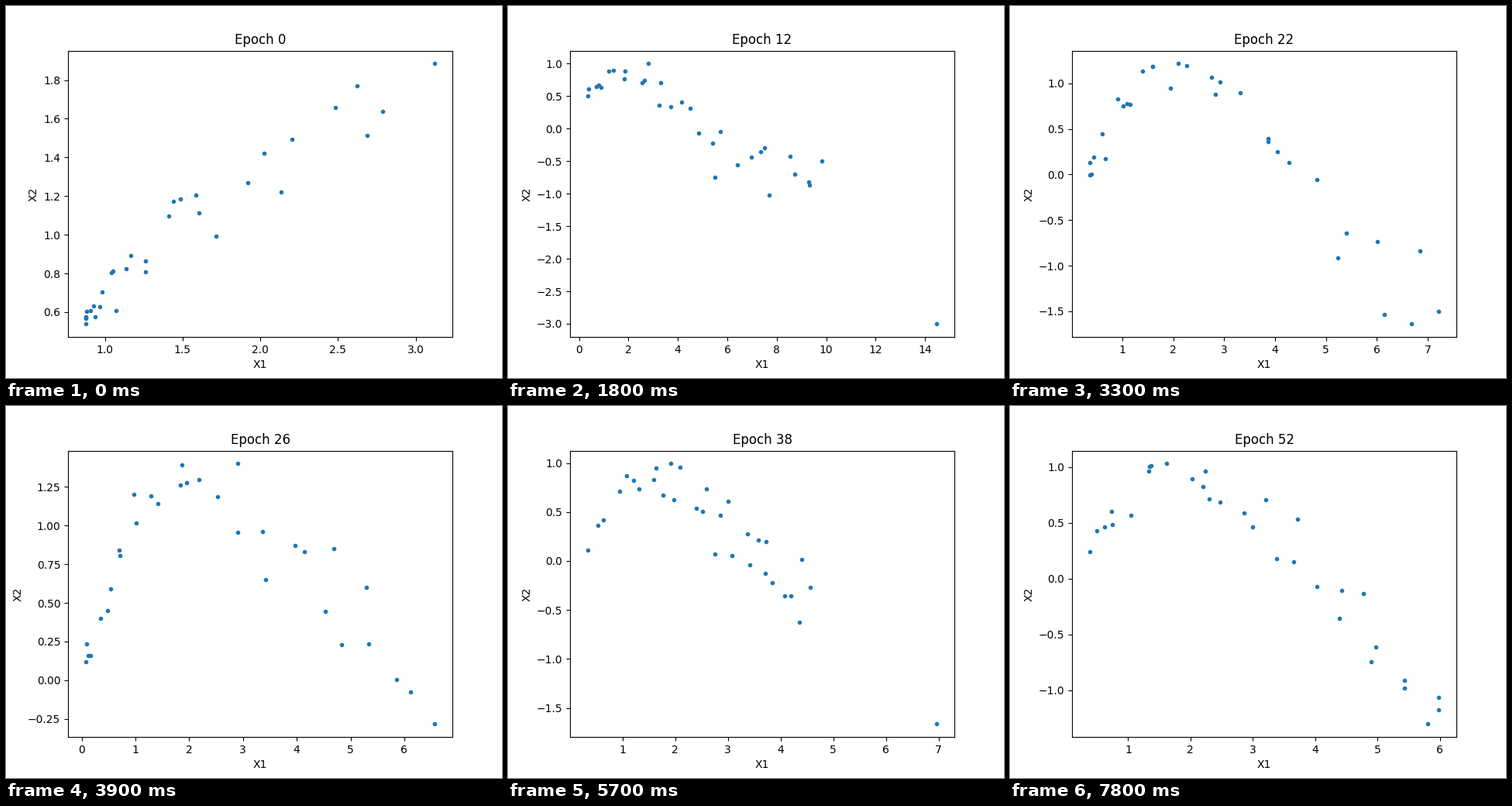
Recreate the animation shown at these times as a matplotlib script. Size 640x480 px, loop 8 s.

```python
import matplotlib.pyplot as plt
import numpy as np
from matplotlib.animation import FuncAnimation

BATCH = 32
STEP_MS = 300
INTERVAL = 100
LOOP_MS = 8000

# Per epoch: left, right, bottom, top of the cloud, then its shape inside that
# box: width of the body before the farthest point, density skew, position of
# the peak and height of the left end.
CLOUDS = {
    0: (.875, 3.124, .538, 1.885, .85, 2.4, 1.6, 0),
    12: (.345, 14.48, -3.005, 1.0, .67, 1.3, .08, .9),
    18: (.63, 7.87, -3.0, 1.035, .96, 1.75, .1, .9),
    26: (.07, 6.57, -.283, 1.4, .93, 1.6, .3, .32),
    34: (.35, 8.14, -1.725, 1.045, .47, .75, .15, .7),
    44: (.32, 5.21, -1.575, .915, .89, 1.1, .2, .75),
    52: (.38, 5.985, -1.305, 1.03, 1.0, 1.2, .25, .68),
}


def cloud_at(epoch):
    """Blend the cloud parameters of the neighbouring epochs."""
    columns = zip(*CLOUDS.values())
    return [np.interp(epoch, list(CLOUDS), column) for column in columns]


def hump(u, peak, start, end=.1):
    """Rise from start to 1 at the peak, then fall to end."""
    rise = start + (1 - start) * np.sin(np.pi / 2 * np.minimum(u / peak, 1))
    fall = np.maximum(u - peak, 0) / abs(1 - peak)
    return rise - (1 - end) * fall ** 1.1


def sample(epoch):
    """Draw one batch scattered around the hump, fitted to its box."""
    rng = np.random.default_rng(epoch)
    left, right, bottom, top, body, skew, peak, start = cloud_at(epoch)

    q = np.linspace(0, 1, BATCH - 1)
    q[1:-1] += rng.uniform(-1, 1, BATCH - 3) / BATCH
    u = np.append(body * np.clip(q, 0, 1) ** skew, 1)

    noise = rng.normal(size=BATCH) * (.02 + .08 * np.append(q, 1))
    noise[[0, -1]] = 0
    v = hump(u, peak, start) + noise
    v = (v - v.min()) / (v.max() - v.min())
    return left + (right - left) * u, bottom + (top - bottom) * v


fig, ax = plt.subplots(figsize=(6.4, 4.8), dpi=100)


def draw(frame):
    epoch = 2 * (frame * INTERVAL // STEP_MS)
    ax.clear()
    ax.plot(*sample(epoch), ".", color="tab:blue")
    ax.set_title(f"Epoch {epoch}")
    ax.set_xlabel("X1")
    ax.set_ylabel("X2")
    return ax.lines


anim = FuncAnimation(fig, draw, frames=LOOP_MS // INTERVAL,
                     interval=INTERVAL, repeat=True, repeat_delay=0)
plt.show()
```
